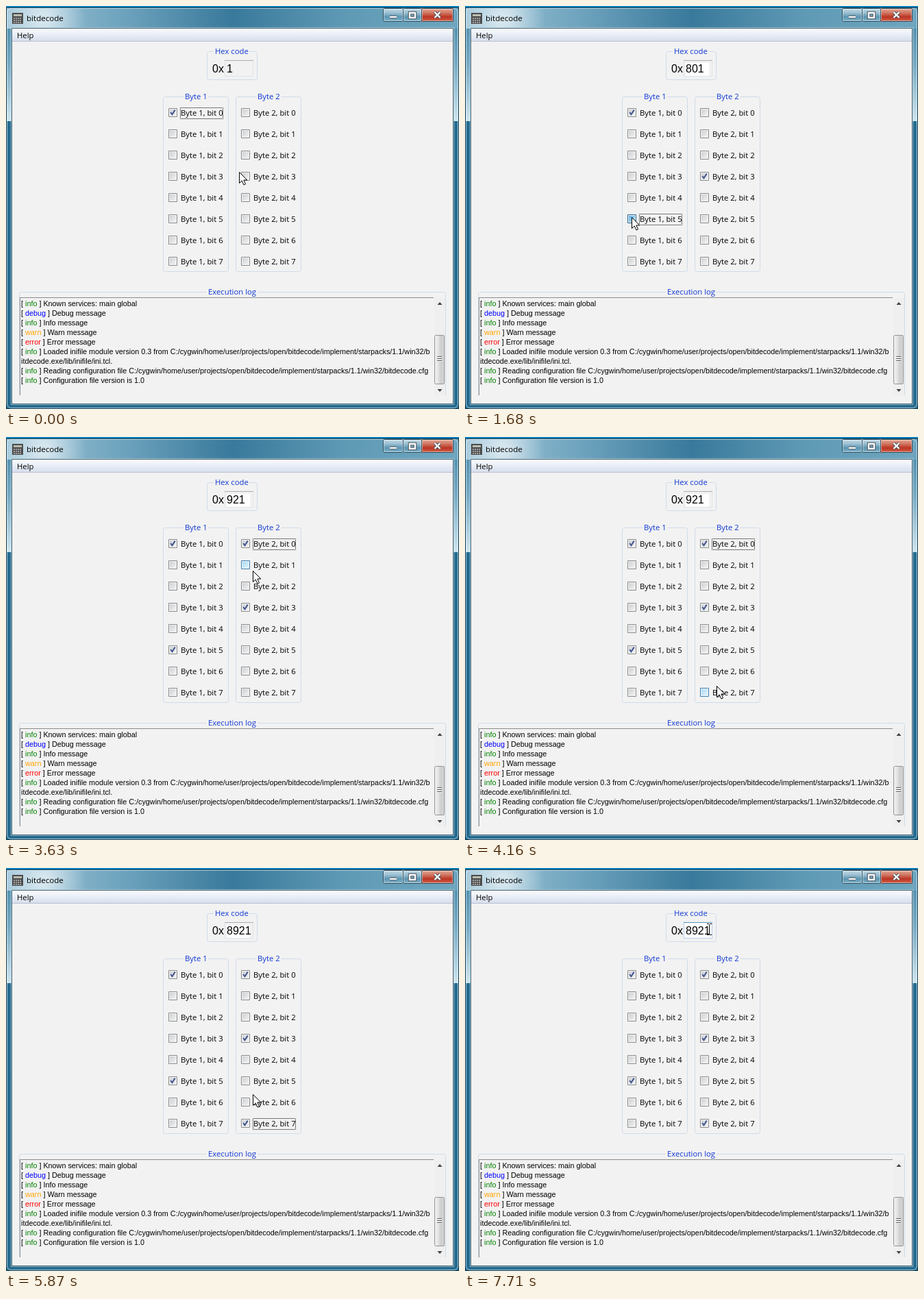
Recreate the animation shown at these times as an HTML page with a canvas. Size 661 px wide and 588 px high, loop 7.99 s.

```html
<!DOCTYPE html>
<html lang="en">
<head>
<meta charset="utf-8">
<title>bitdecode</title>
<style>
html, body { margin: 0; width: 100%; height: 100%; overflow: hidden; }
canvas { display: block; }
</style>
</head>
<body>
<canvas id="stage" width="661" height="588"></canvas>
<script>
const ctx = document.getElementById('stage').getContext('2d');
const LOOP = 7990, TICK = 139;
const UI = '11.3px "Open Sans", sans-serif';
const LOG_FONT = '10.8px "Liberation Sans", sans-serif';
const HEX_FONT = '16px "Liberation Sans", sans-serif';
const BG = '#f2f2f2';

// Places where the pointer turns or rests; it eases between them
const PATH = [
  { t: 0, x: 340, y: 242 }, { t: 300, x: 350, y: 248 }, { t: 720, x: 350, y: 248 },
  { t: 1270, x: 224, y: 317 }, { t: 1680, x: 243, y: 308 }, { t: 2090, x: 243, y: 308 },
  { t: 2770, x: 351, y: 152 }, { t: 3490, x: 351, y: 152 }, { t: 3630, x: 360, y: 195 },
  { t: 4040, x: 372, y: 330 }, { t: 4310, x: 364, y: 386 }, { t: 4870, x: 353, y: 369 },
  { t: 5740, x: 353, y: 369 }, { t: 6150, x: 385, y: 180 }, { t: 6430, x: 359, y: 110 },
  { t: 6710, x: 356, y: 89 }
];
const CLICKS = [{ t: 300, bit: 11 }, { t: 1680, bit: 5 }, { t: 2770, bit: 8 }, { t: 5150, bit: 15 }];
const PRESS_TIME = 130;
const FIELD_CLICK = 7120, CARET_ON = 7430, CARET_OFF = 7710;

const TAGS = { info: '#008000', debug: '#0000ff', warn: '#ffa500', error: '#ff0000' };
const PROJECT = 'C:/cygwin/home/user/projects/open/bitdecode/implement/starpacks/1.1/win32/b';
const LOG = `info|Known services: main global
debug|Debug message
info|Info message
warn|Warn message
error|Error message
info|Loaded inifile module version 0.3 from ${PROJECT}
|itdecode.exe/lib/inifile/ini.tcl.
info|Reading configuration file ${PROJECT}itdecode.cfg
info|Configuration file version is 1.0`.split('\n').map(line => line.split('|'));

function rect(x, y, w, h, fill) {
  ctx.fillStyle = fill;
  ctx.fillRect(x, y, w, h);
}

function box(x, y, w, h, stroke, radius = 0) {
  ctx.strokeStyle = stroke;
  ctx.lineWidth = 1;
  ctx.beginPath();
  ctx.roundRect(x + .5, y + .5, w - 1, h - 1, radius);
  ctx.stroke();
}

function text(str, x, y, color = '#000', font = UI) {
  ctx.font = font;
  ctx.fillStyle = color;
  ctx.fillText(str, x, y);
  return x + ctx.measureText(str).width;
}

function shape(path, x, y, fill, stroke, width = 1) {
  const p = new Path2D(path);
  ctx.save();
  ctx.translate(x, y);
  ctx.lineWidth = width;
  if (fill) { ctx.fillStyle = fill; ctx.fill(p); }
  if (stroke) { ctx.strokeStyle = stroke; ctx.stroke(p); }
  ctx.restore();
}

function gradient(x0, y0, x1, y1, ...colors) {
  const g = ctx.createLinearGradient(x0, y0, x1, y1);
  colors.forEach((c, i) => g.addColorStop(i / (colors.length - 1), c));
  return g;
}

function drawFrame() {
  rect(0, 0, 661, 588, '#276c8f');
  rect(0, 0, 661, 168, gradient(0, 0, 0, 168, '#4688a8', '#79abc3', '#d0e5ee'));
  rect(0, 0, 661, 33, gradient(0, 0, 661, 0, '#a4c8da', '#6fa4be', '#39799b', '#5f9ab5', '#6fa6bf'));
  const glow = ctx.createRadialGradient(55, 18, 8, 55, 18, 62);
  glow.addColorStop(0, 'rgba(240,247,250,.7)');
  glow.addColorStop(1, 'rgba(240,247,250,0)');
  rect(0, 3, 130, 30, glow);
  rect(0, 0, 661, 2, '#0b80bd');
  box(0, 2, 661, 586, '#153b50');
  box(1, 3, 659, 584, 'rgba(215,238,248,.75)', 6);
  box(7, 31, 647, 551, 'rgba(200,228,240,.6)');
  box(8, 32, 645, 549, '#46606e');
  rect(9, 33, 643, 547, BG);
  rect(9, 33, 643, 18, gradient(0, 33, 0, 51, '#fbfcfe', '#e8edf6', '#d8dfee'));
  rect(9, 51, 643, 1, '#b9c1d0');

  rect(9, 10, 16, 16, '#4c4c4c');
  rect(11, 12, 12, 3, '#b9bcb0');
  for (let i = 0; i < 12; i++) rect(11 + i % 4 * 3, 17 + (i >> 2) * 3, 2, 2, '#a4a4a4');
  text('bitdecode', 30, 22, '#000', '11.6px "Open Sans", sans-serif');
  text('Help', 16, 47);
}

function drawCaptionButton(x, w, icon, ...colors) {
  rect(x, 3, w, 20, gradient(0, 4, 0, 22, ...colors));
  box(x, 3, w, 20, '#294b5c', 2);
  box(x + 1, 4, w - 2, 18, 'rgba(255,255,255,.45)', 1);
  shape(icon, x + w / 2, 13, null, '#48535c', 4.4);
  shape(icon, x + w / 2, 13, null, '#fff', 2.4);
}

function drawCaptionButtons() {
  const blue = ['#c4dae5', '#9bbfd1', '#5b94b0', '#82b4cb'];
  drawCaptionButton(550, 30, 'M-5 3H5', ...blue);
  drawCaptionButton(579, 28, 'M-4-3H4V4H-4Z', ...blue);
  drawCaptionButton(606, 47, 'M-4-4L4 4M4-4L-4 4', '#e4a796', '#d07763', '#bb3422', '#d2604a');
}

function drawGroup(label, labelX, x, y, w, h) {
  box(x, y, w, h, '#d0dbea', 3);
  ctx.font = UI;
  rect(labelX - 2, y - 3, ctx.measureText(label).width + 4, 8, BG);
  text(label, labelX, y + 4, '#1038d2');
}

function drawLog() {
  ctx.save();
  ctx.beginPath();
  ctx.rect(9, 400, 643, 168);
  ctx.clip();
  drawGroup('Execution log', 295, 19, 417, 623, 170);
  ctx.restore();
  rect(20, 425, 604, 1, '#8c8c8c');
  rect(20, 425, 1, 143, '#8c8c8c');
  LOG.forEach(([tag, message], i) => {
    const y = 438 + 14 * i;
    let x = 22;
    if (tag) {
      x = text('[ ', x, y, '#000', LOG_FONT);
      x = text(tag, x, y, TAGS[tag], LOG_FONT);
      x = text(' ] ', x, y, '#000', LOG_FONT);
    }
    text(message, x, y, '#000', LOG_FONT);
  });

  rect(625, 426, 16, 142, '#efefef');
  shape('M-3.5 2L0-2L3.5 2Z', 633, 434, '#404040');
  shape('M-3.5-2L0 2L3.5-2Z', 633, 561, '#404040');
  rect(625, 480, 15, 72, gradient(625, 0, 640, 0, '#f4f4f4', '#e6e6e6', '#cdcdcd', '#d8d8d8'));
  box(625, 480, 15, 72, '#949494', 2);
  for (let y = 511; y < 520; y += 3) {
    rect(629, y, 7, 1, '#606060');
    rect(629, y + 1, 7, 1, '#fafafa');
  }
}

function drawBit(bit, checked, hover, pressed, focused) {
  const byte = bit >> 3, x = 237 + 106 * byte, y = 149 + 31 * (bit & 7);
  const [edge, top, bottom] = pressed ? ['#2c628b', '#5eb0e4', '#b5def5']
    : hover ? ['#3c7fb1', '#a9daf5', '#e3f4fc']
    : ['#8a8b8b', '#cdd0d4', '#f3f3f3'];
  rect(x, y, 13, 13, '#f4f4f4');
  box(x, y, 13, 13, edge);
  rect(x + 2, y + 2, 9, 9, gradient(x + 2, y + 2, x + 11, y + 11, top, bottom));
  if (checked) shape('M3.2 6L5.5 9.3L9.7 2.6', x, y, null, hover ? '#142653' : '#42558f', 2);
  text(`Byte ${byte + 1}, bit ${bit & 7}`, x + 18, y + 11);
  if (focused) {
    ctx.setLineDash([1, 1]);
    ctx.lineDashOffset = .5;
    box(x + 17, y - 1, 63, 17, '#000');
    ctx.setLineDash([]);
  }
}

function drawField(value, hover, caret) {
  text('0x', 301, 97, '#000', HEX_FONT);
  if (hover) rect(319, 79, 42, 24, '#fff');
  else if (value > 1) rect(322, 83, 34, 19, '#fff');
  box(319, 79, 42, 24, hover ? '#b5cfe7' : '#dfe4ec');
  rect(319, 79, 42, 1, hover ? '#5794bf' : '#abadb3');
  text(value.toString(16), 322, 97, '#000', HEX_FONT);
  if (caret) rect(349, 82, 1, 18, '#000');
}

function drawPointer(x, y, beam) {
  if (beam) shape('M-3-8H0M1-8H4M.5-7V8M-3 8H0M1 8H4', x, y + .5, null, '#000');
  else shape('M0 0V16L3.7 12.5L6.5 18.5L9 17.4L6.4 11.5H11.4Z', x + .5, y + .5, '#fff', '#000');
}

function pointerAt(time) {
  const t = Math.max(0, 160 + TICK * Math.floor((time - 130) / TICK));
  const next = PATH.findIndex(p => p.t > t);
  if (next < 0) return PATH.at(-1);
  const a = PATH[next - 1], b = PATH[next];
  const u = (t - a.t) / (b.t - a.t), ease = u * u * (3 - 2 * u);
  return {
    x: Math.round(a.x + (b.x - a.x) * ease),
    y: Math.round(a.y + (b.y - a.y) * ease)
  };
}

function render(t) {
  const { x, y } = pointerAt(t);
  const fieldHover = x >= 319 && x < 361 && y >= 79 && y < 103;
  let value = 1, focus = 0, pressed = -1;
  for (const click of CLICKS) {
    if (t < click.t) break;
    focus = click.bit;
    if (t < click.t + PRESS_TIME) pressed = click.bit;
    else value |= 1 << click.bit;
  }
  if (t >= FIELD_CLICK) focus = -1;

  drawFrame();
  drawCaptionButtons();
  drawGroup('Hex code', 305, 293, 66, 74, 42);
  drawGroup('Byte 1', 261, 229, 132, 96, 256);
  drawGroup('Byte 2', 367, 335, 132, 96, 256);
  drawField(value, fieldHover, t >= CARET_ON && t < CARET_OFF);
  for (let bit = 0; bit < 16; bit++) {
    const left = 237 + 106 * (bit >> 3), middle = 156 + 31 * (bit & 7);
    const hover = x >= left && x < left + 80 && Math.abs(y - middle) <= 10;
    drawBit(bit, value >> bit & 1, hover, bit === pressed, bit === focus);
  }
  drawLog();
  drawPointer(x, y, fieldHover);
}

function tick() {
  render(performance.now() % LOOP);
  requestAnimationFrame(tick);
}
tick();
</script>
</body>
</html>
```
